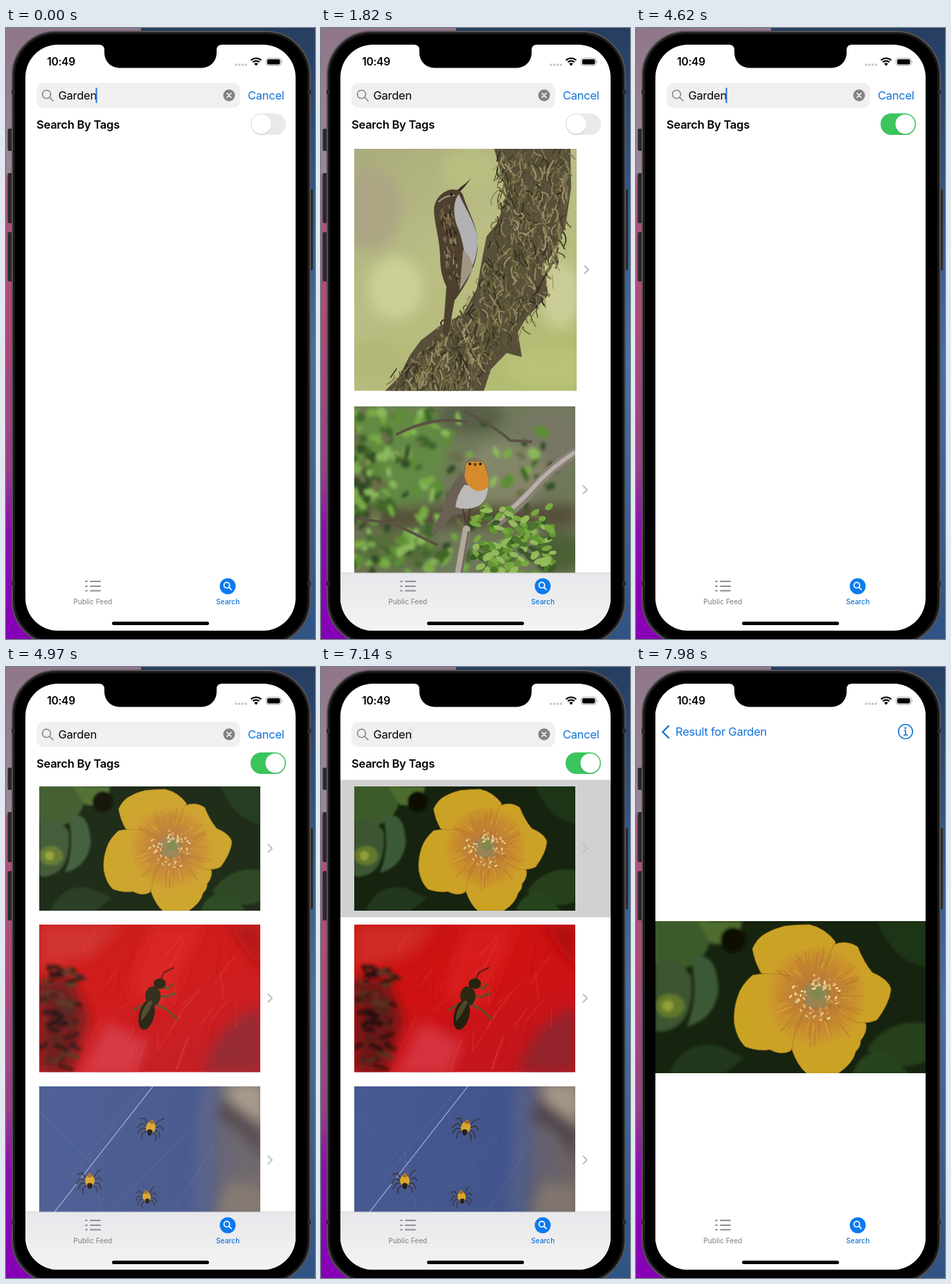
These frames come from a looping animation (446 px wide and 880 px high, 8000 ms). An HTML page:

```html
<!DOCTYPE html>
<html lang="en">
<head>
<meta charset="utf-8">
<title>Photo search</title>
<style>
html, body { margin: 0; width: 100%; height: 100%; overflow: hidden; background: #000; }
svg { display: block; }
body > svg { width: 446px; height: 880px; }
text { font: 16.5px Inter, sans-serif; letter-spacing: -.25px; }
.bold { font-weight: 600; }
.blue { fill: #1273d8; }
.tab { font-size: 10px; font-weight: 500; letter-spacing: .05px; text-anchor: middle; }
.line { fill: none; stroke-linecap: round; stroke-linejoin: round; }
</style>
</head>
<body>
<svg viewBox="0 0 446 880">
<defs>
  <linearGradient id="left" x2="0" y2="1">
    <stop stop-color="#8f7789"/><stop offset=".235" stop-color="#9c8799"/>
    <stop offset=".245" stop-color="#a8587f"/><stop offset=".48" stop-color="#b04a78"/>
    <stop offset=".72" stop-color="#99408a"/><stop offset=".82" stop-color="#8c10ae"/>
    <stop offset="1" stop-color="#8600b6"/>
  </linearGradient>
  <linearGradient id="right" x2="0" y2="1">
    <stop stop-color="#263e60"/><stop offset=".3" stop-color="#315a8e"/>
    <stop offset=".55" stop-color="#4471a6"/><stop offset="1" stop-color="#2f5384"/>
  </linearGradient>
  <linearGradient id="bar" x2="0" y2="1">
    <stop stop-color="#e8e8ec"/><stop offset="1" stop-color="#f3f3f2"/>
  </linearGradient>
  <linearGradient id="olive" x2=".6" y2="1">
    <stop stop-color="#aaab7c"/><stop offset=".5" stop-color="#babd84"/><stop offset="1" stop-color="#b2bb72"/>
  </linearGradient>
  <linearGradient id="red" x2=".5" y2="1">
    <stop stop-color="#c61512"/><stop offset=".5" stop-color="#d01212"/><stop offset="1" stop-color="#c4161c"/>
  </linearGradient>
  <linearGradient id="dusk">
    <stop stop-color="#485a92"/><stop offset=".72" stop-color="#42548c"/>
    <stop offset=".82" stop-color="#625f72"/><stop offset="1" stop-color="#6d6563"/>
  </linearGradient>
  <radialGradient id="petal" gradientUnits="userSpaceOnUse" cx="232" cy="107" r="118">
    <stop offset=".22" stop-color="#bd7c38"/><stop offset=".46" stop-color="#c98d2c"/>
    <stop offset=".62" stop-color="#cda028"/><stop offset="1" stop-color="#c9a422"/>
  </radialGradient>
  <filter id="soft" x="-50%" y="-50%" width="200%" height="200%"><feGaussianBlur stdDeviation="9"/></filter>
  <filter id="slight"><feGaussianBlur stdDeviation="2"/></filter>
  <clipPath id="screen"><rect x="28" y="24" width="390" height="844" rx="47"/></clipPath>
  <path id="more" class="line" d="M-2.5-5.5l5.5 5.5-5.5 5.5" stroke="#bdbdc0" stroke-width="2"/>
  <g id="lens" class="line"><circle r="6"/><path d="M4.5 4.5l5 5"/></g>
  <g id="spider">
    <path class="line" stroke="#37302f" stroke-width="1.4" d="M-5-3l-6-8-6 2M-5 0l-9-3-5 7M-5 3l-8 1-4 8M-4 6l-6 5v7M5-3l5-9 6-4M5 0l9-5 4 5M5 3l8 1 3 8M4 6l6 4 1 7"/>
    <ellipse rx="7" ry="8.5" fill="#d9a62c"/><path d="M-4 5q4-4 8 0-1 7-4 7t-4-7z" fill="#241d1a"/>
    <circle cy="-8" r="3.2" fill="#a5702a"/>
  </g>

  <symbol id="flower" viewBox="0 0 390 219" preserveAspectRatio="none">
    <rect width="390" height="219" fill="#16240f"/>
    <g filter="url(#slight)">
      <circle cx="28" cy="18" r="52" fill="#3c5a2c"/><path d="M60 0h65q-5 40-45 32z" fill="#4d6c2e"/>
      <circle cx="112" cy="27" r="18" fill="#070c06"/>
      <path d="M0 60q30-12 52 20 4 60-26 74-16 8-26 3z" fill="#3d5733"/>
      <path d="M52 55q36-18 39 45-6 42-46 52 18-40 7-97z" fill="#3c5a38"/>
      <ellipse cx="21" cy="122" rx="21" ry="17" fill="#62782c"/><circle cx="18" cy="122" r="8" fill="#93a038"/>
      <path d="M20 219q20-48 70-40l38 18-28 22z" fill="#20391a"/>
      <path d="M305 185q30-45 85-38v56q-50 18-85-18z" fill="#25401c"/>
      <path d="M320 0h70v66q-45-6-70-66z" fill="#1e3519"/>
      <path d="M285 219q12-36 50-30l30 30z" fill="#28441f"/>
    </g>
    <g fill="url(#petal)" stroke="#a87720" stroke-width=".8">
      <path d="M225 105L200 88Q165 82 152 74 143 58 140 40 146 26 157 19 170 11 187 7 205 5 222 5 245 10 260 30L248 78z"/>
      <path d="M228 105L196 80Q165 72 140 78 124 92 119 108 112 128 114 148 118 170 130 181 150 188 165 185 182 194 195 187 212 160 228 118z"/>
      <path d="M225 115Q200 150 197 185 205 208 218 219H264Q285 205 289 188 297 180 296 172 306 160 304 148 280 130 250 112z"/>
      <path d="M235 105Q246 60 257 34 275 26 292 37 300 58 313 74 337 84 340 98 338 118 320 142 308 148 290 146L250 120z"/>
    </g>
    <g id="veins" class="line" stroke-width="1"></g>
    <circle cx="232" cy="107" r="20" fill="#9a8354"/><circle cx="233" cy="104" r="9" fill="#7d8a4c"/>
    <g id="stamens"></g>
  </symbol>
</defs>

<rect width="446" height="880" fill="url(#left)"/>
<path d="M195 0H446V880H223V30H195z" fill="url(#right)"/>
<g fill="#2a282a">
  <rect x="2.5" y="145" width="8" height="32" rx="2"/><rect x="2.5" y="209" width="8" height="72" rx="2"/>
  <rect x="2.5" y="294" width="8" height="71" rx="2"/><rect x="436" y="232" width="7" height="117" rx="2"/>
</g>
<rect x="9" y="5" width="430" height="883" rx="63" fill="#1b1a1b" stroke="#565254" stroke-width="2"/>
<path d="M8 92h5M8 800h5M435 92h5M435 800h5" stroke="#2a2829" stroke-width="6"/>
<rect x="13" y="9" width="422" height="875" rx="59"/>

<g clip-path="url(#screen)">
  <rect x="28" y="24" width="390" height="844" fill="#fff"/>
  <g id="page">
    <g id="search">
      <rect x="44" y="79" width="294" height="36" rx="10" fill="#f0f0f1"/>
      <use href="#lens" x="58.5" y="95.5" stroke="#858589" stroke-width="1.6"/>
      <text x="75.5" y="103">Garden</text>
      <rect id="caret" x="129.5" y="86" width="2" height="22" fill="#2673e4"/>
      <circle cx="322" cy="97" r="8.5" fill="#838387"/>
      <path class="line" d="M319 94l6 6m0-6l-6 6" stroke="#fff" stroke-width="1.6"/>
      <text class="blue" x="349" y="102.5">Cancel</text>
    </g>
    <text class="bold" x="44" y="144.5">Search By Tags</text>
    <rect x="353" y="123" width="51" height="31" rx="15.5" fill="#e9e9ea"/>
    <rect id="green" x="353" y="123" width="51" height="31" rx="15.5" fill="#3ac55d"/>
    <circle id="shade" cy="140" r="14.2" fill="#000" opacity=".1"/><circle id="knob" cy="138.5" r="14" fill="#fff"/>

    <g id="birds">
      <svg x="48" y="174" width="321" height="348.5" viewBox="48 174 321 348.5">
        <rect x="48" y="174" width="321" height="349" fill="url(#olive)"/>
        <g filter="url(#soft)">
          <ellipse cx="70" cy="260" rx="45" ry="60" fill="#aca684"/><ellipse cx="215" cy="205" rx="40" ry="30" fill="#b9bf80"/>
          <ellipse cx="108" cy="375" rx="40" ry="45" fill="#cdd095"/><ellipse cx="80" cy="480" rx="45" ry="30" fill="#b2b878"/>
          <ellipse cx="345" cy="385" rx="30" ry="50" fill="#cacd97"/><ellipse cx="330" cy="490" rx="60" ry="30" fill="#b9c278"/>
        </g>
        <path d="M250 174H360L361 230 353 285 340 315 322 340 328 385 296 418 284 438 290 474 268 468 245 492 235 523H92L112 503 128 472 144 450 170 430 205 412 225 375 233 330 239 300 255 280 268 240 260 210z" fill="#574f39"/>
        <g id="moss" class="line"></g>
        <path d="M192 238L203 228Q212 222 217 215 211 225 205 231L197 240z" fill="#3a3028"/>
        <path d="M196 233C180 229 163 245 163 262 164 285 171 300 172 330 172 350 176 362 181 372L176 440 183 445 193 392C212 368 227 335 226 310 226 285 214 268 206 244Q204 235 196 233z" fill="#4d402e"/>
        <path d="M199 239C207 258 226 285 226 308 226 328 218 348 208 362 211 335 205 305 196 284 191 270 190 250 199 239z" fill="#b1b1b3"/>
        <path d="M205 320Q218 330 219 348L200 378z" fill="#a09684"/>
        <path d="M170 250q10-9 22-9" class="line" stroke="#a39880" stroke-width="2"/>
        <circle cx="188" cy="240" r="2" fill="#15110d"/><g id="flecks" class="line"></g>
      </svg>
      <svg x="48" y="545" width="319" height="240" viewBox="48 545 319 240">
        <rect x="48" y="545" width="319" height="240" fill="#6f795a"/>
        <g filter="url(#soft)">
          <path d="M48 545h110l30 70-40 70-100 10z" fill="#648a44"/><ellipse cx="330" cy="590" rx="50" ry="45" fill="#777763"/>
          <ellipse cx="265" cy="640" rx="60" ry="45" fill="#848669"/><ellipse cx="215" cy="560" rx="50" ry="25" fill="#596147"/>
          <path d="M48 692L367 686V718H48z" fill="#554b37"/><ellipse cx="110" cy="750" rx="60" ry="28" fill="#556d3a"/>
          <ellipse cx="345" cy="755" rx="35" ry="30" fill="#4b5f34"/><ellipse cx="60" cy="660" rx="18" ry="30" fill="#2c3d20"/>
        </g>
        <g id="leaves" filter="url(#slight)"></g>
        <g class="line" stroke="#887f75">
          <path d="M372 608Q335 630 310 660T246 718" stroke-width="14"/><path d="M365 612Q330 635 308 660T252 712" stroke="#b8b0a8" stroke-width="6"/>
          <path d="M50 706l55 8 62 30M208 552q40 20 65 42l30 2M110 585q50-26 100-18" stroke="#5c5145" stroke-width="4"/>
          <path d="M198 790L210 722" stroke="#b1a89e" stroke-width="11"/><path d="M202 790L213 726" stroke="#72685d" stroke-width="3"/>
        </g>
        <g id="sprigs"></g>
        <path d="M207 640C192 646 180 676 176 694L158 727 165 731 190 702C205 700 236 690 241 662 243 640 238 622 224 619 212 619 206 628 207 640z" fill="#6a6154"/>
        <path d="M207 658Q196 672 194 690 210 696 228 688 240 680 241 662z" fill="#bcbab8"/>
        <path d="M209 628q7-6 13-3 8-4 13 2 7 14 7 33-8 9-19 6-13-6-16-20z" fill="#d58a2c"/>
        <path d="M211 626q12-14 24 0l-12-2z" fill="#82765f"/>
        <circle cx="215" cy="628" r="1.8"/><circle cx="230" cy="628" r="1.8"/><path d="M220 627h5l-2.5 5z" fill="#40342a"/>
        <path class="line" d="M205 693l4 20m6-20l-3 20" stroke="#4a3b30" stroke-width="2"/>
      </svg>
      <use href="#more" x="383" y="348"/><use href="#more" x="381" y="665"/>
    </g>

    <g id="tagged">
      <rect id="row" x="28" y="162.5" width="390" height="198" fill="#d1d1d3"/>
      <use href="#flower" x="48" y="172" width="319" height="179"/>
      <svg x="48" y="371" width="319" height="212.5" viewBox="48 371 319 212.5">
        <rect x="48" y="371" width="319" height="213" fill="url(#red)"/>
        <g filter="url(#soft)">
          <path d="M48 371h120l-40 45-80 20z" fill="#cf2a28"/><path d="M105 590l40-80 60 30-20 50z" fill="#d5303c"/>
          <path d="M210 371l-35 100 60 20 50-120z" fill="#d81c1a"/><path d="M370 490q-65 20-85 95h85z" fill="#932029"/>
          <path d="M320 371h50v70z" fill="#b00e10"/><path d="M48 450l45-5 25 60-25 80H48z" fill="#6d1712"/>
        </g>
        <g id="crease" class="line"></g><g id="anthers" class="line" filter="url(#slight)"></g>
        <path class="line" d="M212 484l-14 2-14 8M222 474l10 1 12-5M216 486l14 6 17 15M226 462l8 1 6-6" stroke="#5c4d24" stroke-width="3"/>
        <path class="line" d="M224 449l4-9 14-7" stroke="#2a2114" stroke-width="1.5"/>
        <ellipse cx="203" cy="501" rx="11" ry="22" transform="rotate(14 203 501)" fill="#24200f"/>
        <ellipse cx="212" cy="474" rx="11" ry="14" fill="#2b2814"/><ellipse cx="222" cy="456" rx="9" ry="7.5" fill="#25230f"/>
        <path d="M208 480q-14 12-13 30 10-10 17-28z" fill="#6b5f3a" opacity=".6"/>
      </svg>
      <svg x="48" y="604" width="319" height="181" viewBox="48 604 319 181">
        <rect x="48" y="604" width="319" height="181" fill="url(#dusk)"/>
        <g filter="url(#soft)">
          <path d="M318 600h55v60q-50-10-55-60z" fill="#a59787"/><path d="M300 650q45 10 70 70v-60l-55-40z" fill="#50454c"/>
          <path d="M322 740l50 10v40h-70z" fill="#81766d"/><path d="M282 604h22l-12 181h-20z" fill="#556087"/>
        </g>
        <path class="line" d="M212 604L70 785" stroke="#a9b3d1" stroke-width="1.2"/>
        <path class="line" d="M200 604L88 740M290 640L150 785M120 700l18 85M300 690l-60 95M48 640l80 80" stroke="#8e9bc4" stroke-width=".6" opacity=".4"/>
        <use href="#spider" transform="translate(209 663)rotate(12)"/><use href="#spider" transform="translate(121 740)"/>
        <use href="#spider" transform="translate(203 763)rotate(-8)scale(.85)"/>
      </svg>
      <use href="#more" x="381" y="261"/><use href="#more" x="381" y="477"/><use href="#more" x="381" y="710"/>
    </g>
  </g>

  <rect id="dim" x="28" y="24" width="390" height="844"/>
  <g id="detail">
    <rect x="28" y="24" width="390" height="844" fill="#fff"/>
    <use id="hero" href="#flower" x="28" width="390" height="219"/>
  </g>
  <g id="nav" class="blue">
    <path class="line" d="M47 85l-8.5 8.5 8.5 8.5" stroke="#1273d8" stroke-width="2.4"/>
    <text id="title" y="99">Result for Garden</text>
    <circle cx="389" cy="93" r="10.2" fill="none" stroke="#1273d8" stroke-width="1.6"/>
    <circle cx="388.8" cy="88" r="1.4"/>
    <path class="line" d="M387 91.5h2.2v6.5m-2.7 0h5.4" stroke="#1273d8" stroke-width="1.5"/>
  </g>

  <g id="glass">
    <rect x="28" y="785" width="390" height="83" fill="#f9f9f9"/>
    <rect id="tint" x="28" y="785" height="83" fill="url(#bar)"/>
    <path d="M28 785h390" stroke="#cfcfd1"/>
  </g>
  <path class="line" d="M115 797h2m-2 7h2m-2 6.5h2M122 797h14m-14 7h14m-14 6.5h14" stroke="#8e8e93" stroke-width="1.9"/>
  <text class="tab" x="125.3" y="830" fill="#8e8e93">Public Feed</text>
  <circle cx="320" cy="804" r="11.5" fill="#0a7aef"/>
  <use href="#lens" transform="translate(318.7 802.4)scale(.68)" stroke="#fff" stroke-width="2.5"/>
  <text class="tab blue" x="320.3" y="830">Search</text>
  <rect x="153" y="855" width="140" height="5" rx="2.5"/>

  <text class="bold" x="79.5" y="54.3" text-anchor="middle" style="font-size:15.5px">10:49</text>
  <path class="line" d="M332 53h0m4.8 0h0m4.8 0h0m4.8 0h0" stroke="#c6c6c8" stroke-width="3.6"/>
  <path d="M361 54.5l-2.7-2.9a3.8 3.8 0 0 1 5.4 0z"/>
  <path d="M356.3 49.3a6.7 6.7 0 0 1 9.4 0M353.6 46.6a10.4 10.4 0 0 1 14.8 0" fill="none" stroke="#000" stroke-width="2.1"/>
  <rect x="375.5" y="43.5" width="21.5" height="10.5" rx="3.2" fill="none" stroke="#a3a3a3"/>
  <rect x="377" y="45" width="18.5" height="7.5" rx="2"/><path d="M398.3 47q2 1.7 0 3.6z" fill="#a3a3a3"/>
  <path d="M134 24q8 0 8 8v4a21.5 21.5 0 0 0 21.5 21.5h119a21.5 21.5 0 0 0 21.5-21.5v-4q0-8 8-8z"/>
</g>
</svg>
<script>
const el = id => document.getElementById(id);
const set = (id, attrs) => { for (const k in attrs) el(id).setAttribute(k, attrs[k]); };
const clamp = v => Math.max(0, Math.min(1, v));
const ramp = (t, a, b) => clamp((t - a) / (b - a));

let seed = 7;
const rnd = (a, b) => (seed = seed * 16807 % 2147483647, a + (b - a) * seed / 2147483647);
const pick = list => list[Math.floor(rnd(0, list.length))];
const scatter = (id, n, make) => { el(id).innerHTML = Array.from({ length: n }, make).join(''); };
const stroke = (x, y, dx, dy, bend, color, w) =>
  `<path d="M${x} ${y}q${dx / 2 + bend} ${dy / 2} ${dx} ${dy}" stroke="${color}" stroke-width="${w}"/>`;
const blob = (x, y, rx, ry, turn, color) =>
  `<ellipse rx="${rx}" ry="${ry}" fill="${color}" transform="translate(${x} ${y})rotate(${turn})"/>`;

const spine = [[308, 172], [306, 270], [279, 380], [200, 465], [150, 520]];
scatter('moss', 1100, () => {
  const s = rnd(0, 4), i = Math.min(3, Math.floor(s)), f = s - i;
  const [x, y] = spine[i].map((v, k) => v + (spine[i + 1][k] - v) * f);
  return stroke(x + rnd(-52, 50), y + rnd(-18, 14), rnd(-11, 11), rnd(3, 22), rnd(-8, 8),
    pick(['#837654', '#a1946f', '#352f21', '#686538', '#4a472a', '#8d8558', '#5f5640']), rnd(.8, 2.4));
});
scatter('flecks', 75, () => {
  const y = rnd(255, 365);
  return stroke(rnd(169, 188) + (y - 255) * .12, y, rnd(-1, 3), rnd(3, 8), 0,
    pick(['#8f7c5b', '#2a231b', '#6f5d42']), rnd(1, 2.5));
});
scatter('leaves', 230, () => {
  const x = 48 + rnd(0, 17) ** 2;
  return blob(x, rnd(550, 785), rnd(4, 12), rnd(3, 8), rnd(0, 180),
    pick(['#78aa45', '#5b8e34', '#41662c', '#8ab95b', '#344e27', '#6a7048']));
});
scatter('sprigs', 130, () => blob(rnd(222, 335), rnd(700, 790) - rnd(0, 15), rnd(5, 10), rnd(3, 5), rnd(-50, 50),
  pick(['#78a93f', '#639532', '#93bb5a', '#4c752e', '#3d5a2a'])));
scatter('veins', 90, () => {
  const a = rnd(0, 6.28), r = rnd(32, 55), d = rnd(8, 26), c = Math.cos(a), s = Math.sin(a);
  return stroke(232 + r * c, 107 + r * s, d * c, d * s, 0, pick(['#c07a32', '#d0a236', '#b58428']), rnd(.6, 1.8));
});
scatter('stamens', 85, () => {
  const a = rnd(0, 6.28), r = rnd(14, 39);
  return blob(232 + r * Math.cos(a), 110 + r * .88 * Math.sin(a), rnd(1.8, 3.4), 1.5, rnd(0, 180),
    pick(['#e2bd73', '#efd89b', '#c99b4c', '#a37834']));
});
scatter('crease', 45, () => stroke(rnd(120, 340), rnd(371, 560), rnd(-30, 5), rnd(15, 50), rnd(-5, 5),
  pick(['#e03c3844', '#a90c1144', '#e0484444']), rnd(.8, 3)));
scatter('anthers', 60, () => stroke(rnd(48, 96), rnd(428, 575), rnd(2, 20), rnd(-9, 9), 3,
  pick(['#34150f', '#55201a', '#5a3424', '#2a0f0c']), rnd(3, 8)));

function draw(t) {
  // caret: fade out, pause, fade in, hold
  const u = (t + 600) % 1050;
  set('caret', { opacity: Math.max(clamp(1 - u / 190), clamp((u - 370) / 170)) });

  const birds = ramp(t, 420, 640) * (1 - ramp(t, 3990, 4270));
  const tagged = ramp(t, 4760, 4980);
  set('birds', { opacity: birds });
  set('tagged', { opacity: tagged });

  const k = ramp(t, 3920, 4150), on = k * k * (3 - 2 * k);
  set('green', { opacity: on });
  set('knob', { cx: 368.5 + 20 * on });
  set('shade', { cx: 368.5 + 20 * on });

  // critically damped push to the detail page
  const w = Math.max(0, t - 7175) * .0183;
  const rest = (1 + w) * Math.exp(-w), p = 1 - rest;
  const settle = ramp(t, 7500, 7700);
  set('row', { opacity: t >= 7140 ? 1 : 0 });
  set('page', { transform: `translate(${-117 * p})` });
  set('search', { opacity: clamp(1 - 1.4 * p) });
  set('dim', { opacity: .09 * p });
  set('detail', { transform: `translate(${390 * rest})` });
  set('hero', { y: 373 - 7 * settle });
  set('nav', { opacity: p * p });
  set('title', { x: 57 + 112 * rest });
  set('glass', { opacity: Math.max(birds, tagged) * (1 - settle) });
  set('tint', { width: Math.min(390, 640 * rest) });
}

const start = performance.now();
(function tick() {
  draw((performance.now() - start) % 8000);
  requestAnimationFrame(tick);
})();
</script>
</body>
</html>
```
